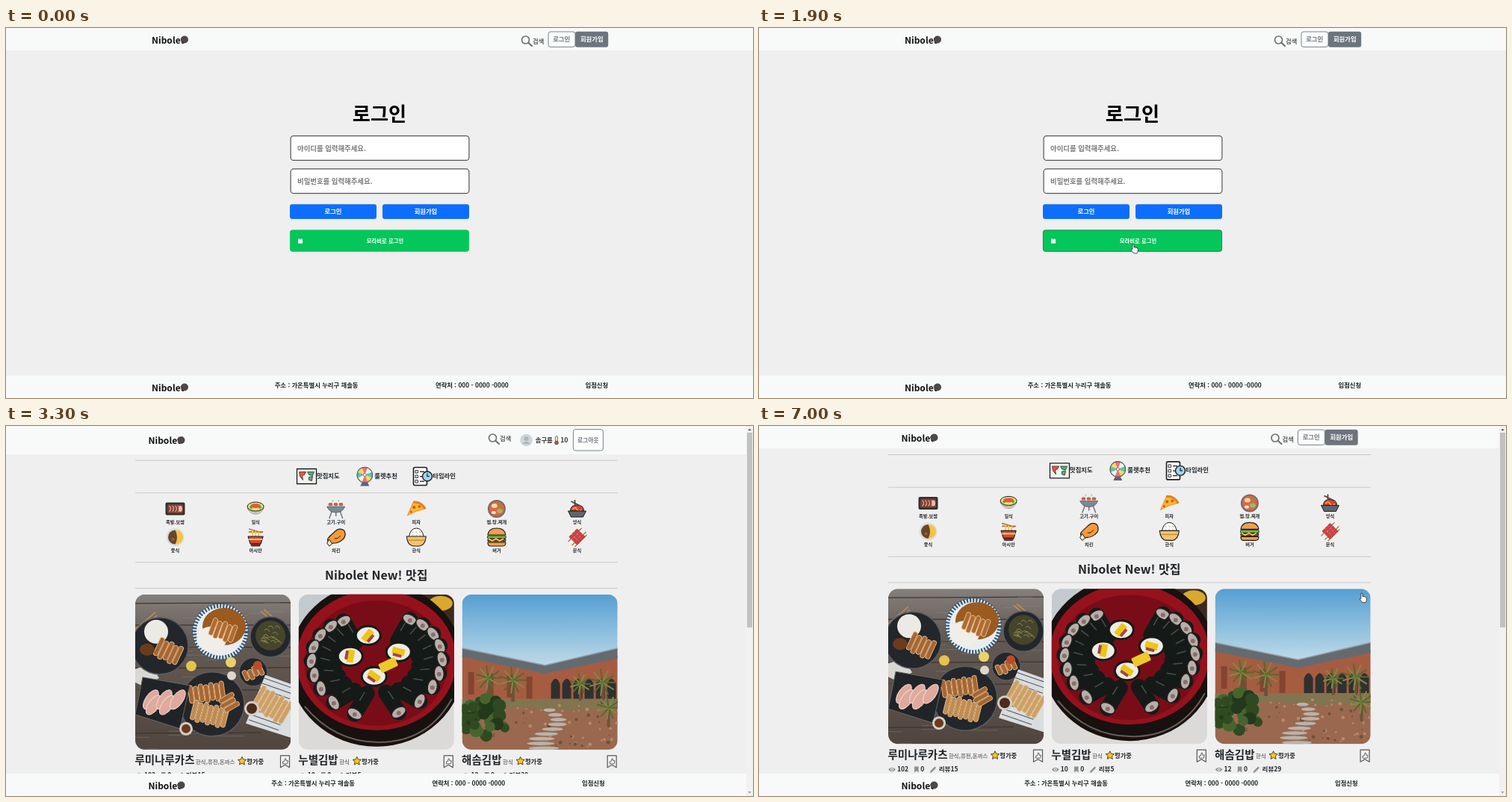
These frames come from a looping animation (1000 by 496 pixels, 7.1 s). An HTML page:

```html
<!DOCTYPE html>
<html lang="ko">
<head>
<meta charset="utf-8">
<title>로그인</title>
<style>
html, body { margin: 0; width: 100%; height: 100%; overflow: hidden; background: #fefefe; }
#stage { display: block; width: 100vw; height: 100vh; }
text { font-family: 'Noto Sans CJK KR', 'Noto Sans KR', 'Noto Sans CJK', sans-serif; font-weight: 700; white-space: pre; }
.loading .late { font-weight: 300; }
.loading .lazy { display: none; }
</style>
</head>
<body>
<svg id="stage" viewBox="0 0 1000 496"></svg>
<script>
const LOOP = 7100;
const BRAND = 'Nibolet';
const INK = '#212529', GRAY = '#6c757d', BAR = '#f8faf9', PAGE = '#efefef';

// ---------- drawing helpers ----------
// y is the visual middle of the line
const text = (s, x, y, size, fill = INK, anchor = 'start') =>
  `<text x="${x}" y="${y + size * 0.37}" font-size="${size}" fill="${fill}" text-anchor="${anchor}">${
    s.replace(/[맛밥]/g, '<tspan class="late">$&</tspan>')}</text>`;
const mid = (s, x, y, size, fill) => text(s, x, y, size, fill, 'middle');
const rect = (x, y, w, h, fill, r = 0, more = '') =>
  `<rect x="${x}" y="${y}" width="${w}" height="${h}" rx="${r}" fill="${fill}" ${more}/>`;
const dot = (x, y, r, fill, more = '') => `<circle cx="${x}" cy="${y}" r="${r}" fill="${fill}" ${more}/>`;
const oval = (x, y, rx, ry, fill, more = '') =>
  `<ellipse cx="${x}" cy="${y}" rx="${rx}" ry="${ry}" fill="${fill}" ${more}/>`;
const path = (d, fill, more = '') => `<path d="${d}" fill="${fill}" ${more}/>`;
const line = (d, color, w = 1, more = '') =>
  `<path d="${d}" fill="none" stroke="${color}" stroke-width="${w}" ${more}/>`;
const at = (x, y, body, more = '') => `<g transform="translate(${x} ${y})" ${more}>${body}</g>`;
const group = (id, body) => `<g id="${id}">${body}</g>`;
const times = (n, f) => Array.from({ length: n }, (_, i) => f(i)).join('');
const edge = (w = 1, c = '#1c1c1c') => `stroke="${c}" stroke-width="${w}" stroke-linejoin="round"`;

let seed = 7;
const rnd = () => (seed = (seed * 16807) % 2147483647) / 2147483647;

// ---------- shared page parts ----------
const logo = (x, y) => text(BRAND, x, y, 12, '#111') + dot(x + 44, y - 1, 5, '#4d4845');

const search = (x, y) =>
  dot(x - 1, y - 1, 5, 'none', edge(1.7, '#6f6f6f')) +
  line(`M${x + 3} ${y + 3}l4.5 4`, '#6f6f6f', 2.2, 'stroke-linecap="round"');

const guestBar = dx => rect(0, 0, 1000, 30, BAR) + at(dx, 0,
  logo(195, 16.5) + search(696.5, 17) + text('검색', 705, 18, 8.3, '#5c5c5c') +
  rect(726, 5, 36, 20.4, '#fcfdfd', 3, edge(0.9, GRAY)) + mid('로그인', 743.7, 15, 8.4, GRAY) +
  rect(762, 4.7, 44.2, 21, GRAY, 3) + mid('회원가입', 784.3, 15, 8.4, '#fff'));

const footer = dx => rect(0, 466, 1000, 30, BAR) + at(dx, 0,
  logo(195, 482.5) +
  text('주소 : 가온특별시 누리구 해솔동', 359.7, 479.3, 8.35) +
  text('연락처 : 000 - 0000 -0000', 575, 479.3, 8.35) +
  text('입점신청', 775.5, 479.3, 8.35));

// ---------- login page ----------
const field = (y, hint) =>
  rect(381.1, y, 238.8, 32.8, '#fff', 4, edge(1.2, '#555')) + text(hint, 390, y + 16.6, 9.4, '#7a7a7a');
const blue = (x, label) => rect(x, 236.3, 116, 19.8, '#0d6efd', 3) + mid(label, x + 58, 246.4, 8.3, '#fff');

const loginPage = rect(0, 0, 1000, 496, PAGE) + guestBar(0) + footer(0) +
  mid('로그인', 500, 115, 26.2, '#000') +
  field(144.6, '아이디를 입력해주세요.') +
  group('second', field(188.9, '비밀번호를 입력해주세요.')) +
  group('buttons', blue(380, '로그인') + blue(504, '회원가입') +
    rect(380.4, 270.9, 239.2, 28.6, '#03c75a', 3, 'id="social" stroke="#03c75a" stroke-width="0.8"') +
    rect(391, 282.7, 6, 6, '#fff') + mid('모라비로 로그인', 507.5, 285.6, 7.35, '#fff')) +
  group('errors', text('아이디를 입력해주세요.', 380.4, 184, 8.35, '#dc3545') +
    text('비밀번호를 입력해주세요.', 380.4, 240.7, 8.35, '#dc3545'));

// ---------- icons, centred on 0,0 ----------
const mapIcon = rect(-13, -10, 26, 20, '#f6f4ee', 0, edge(1.3)) +
  path('M-10-6h9l-2 4-3 1 1 6-4-5z', '#e4574c', edge(0.7)) +
  path('M1-6h9l-2 5-5-1z', '#4fb27c', edge(0.7)) + path('M3 1l5-1-1 6-4-1z', '#4fb27c', edge(0.7));
const wheelIcon = path('M-6 13l3-6h6l3 6z', '#5b6472') +
  times(8, i => path('M0-2L-4.1-11.9A10.7 10.7 0 0 1 4.1-11.9z',
    ['#f26d7d', '#f7f3e8', '#57c7a0', '#ffd667'][i % 4], `transform="rotate(${i * 45} 0 -2)"`)) +
  dot(0, -2, 10.3, 'none', edge(1.1, '#555c66')) + dot(0, -2, 2, '#fff', edge(0.8, '#555'));
const timeIcon = rect(-12.5, -12, 18, 24, '#fff', 2, edge(1.6)) +
  times(3, i => rect(-10, -8 + i * 6.5, 3.5, 3.5, '#fff', 0, edge(0.9)) + line(`M-4 ${-6.3 + i * 6.5}h6`, '#1c1c1c', 1.3)) +
  dot(6, 0, 6.5, '#9fd4f4', edge(1.4)) + line('M6-4v4h3', '#1c1c1c', 1.2);

const pork = rect(-13, -8.5, 26, 17, '#34302f', 2) + rect(-10.5, -6, 21, 12, '#7a4238', 2) +
  times(4, i => line(`M${-8 + i * 4}-4q4 4 0 8`, '#e9a08a', 1.3)) + oval(7, 0, 2.5, 4, '#f0b9a4');
const sushi = oval(0, -3, 11, 6, '#f4e06a', edge(1)) + oval(0, -4, 7, 3, '#e7563f') + dot(-6, -2, 2, '#57a845') +
  dot(6, -2, 2, '#57a845') + path('M-11-1q11 12 22 0q-4 8-11 8t-11-8z', '#f7f7f2', edge(0.7, '#555'));
const grill = line('M-5 2l-4 11M5 2l4 11M0 4v6', '#6c7680', 1.5) + path('M-12-3h24q-3 8-12 8t-12-8z', '#7d8993', edge(0.7, '#46505a')) +
  times(3, i => rect(-10 + i * 7, -8, 5.5, 4, '#c9653f', 1.5)) + line('M-5-12q2 2 0 3M3-12q2 2 0 3', '#aaa');
const pizza = path('M-12 9L-4-9Q6-10 12 0Q0 2-12 9z', '#fdb827', edge(0.7, '#d37a17')) +
  line('M-4-9Q6-10 12 0', '#d98324', 3) + dot(-3, -2, 2, '#dc4b32') + dot(4, -3, 1.8, '#dc4b32') + dot(-7, 4, 1.5, '#dc4b32');
const stew = dot(0, 0, 12, '#70706c') + dot(0, 0, 10, '#e5623d') + oval(-3, -4, 4, 3, '#f6d9a6') +
  oval(4, 3, 4, 3, '#8fc06b') + oval(-4, 5, 3, 2, '#f3eee0') + dot(4, -5, 2, '#57a845');
const pasta = path('M-9 3Q-9-5 0-5T9 3z', '#d8452f', edge(1)) + line('M-6 1q3-5 6 0t6 0', '#f7b84b', 1.4) +
  line('M-8-10L4-4M-3-12v7', '#444', 1.7) + path('M-12 3h24l-4 8h-16z', '#5d6670', edge(1));
const curry = dot(0, 0, 12, '#d9dfe2') + dot(1, 0, 9.5, '#f5c341') + path('M0-9.5A9.5 9.5 0 0 0 0 9.5Q5 0 0-9.5z', '#6b4528') + dot(-3, 3, 2, '#93633a');
const noodles = line('M-9-11L8-6M-9-7h19', '#b8743a', 1.8) + line('M-4-9V0M0-8V0M4-7V0', '#f5c65a', 2) +
  path('M-10-1h20l-3 10h-14z', '#d8492f', edge(1.1)) + rect(-6, 9, 12, 3, '#8d2d21', 1, edge(0.8)) + line('M-9 3h18', '#f7d27c', 2);
const chicken = path('M-2 8Q-12 10-11 2Q-8-2-3-6Q4-14 11-9Q15-1 8 4Q3 8-2 8z', '#f59a3c', edge(1.2)) +
  line('M-2 2q5 1 8-4', '#1c1c1c') + path('M-9 3l-3 5 3 4 4-3z', '#fbe7c6', edge(1));
const rice = path('M-10 0Q-8-12 0-12T10 0z', '#fffdf3', edge(1)) +
  times(6, i => line(`M${-6 + (i % 3) * 5} ${-7 + (i > 2) * 4}l2 1`, '#999', 0.9)) +
  path('M-13-1h26q-1 12-9 13h-8q-8-1-9-13z', '#f2c46b', edge(1.1)) + line('M-11 4h22', '#c78d3c', 1.4);
const burger = path('M-12-3Q-11-12 0-12T12-3z', '#f0a04b', edge(1.1)) + rect(-12.5, -2, 25, 4, '#6bbf4a', 2, edge(0.9)) +
  rect(-12, 2, 24, 4, '#8a4329', 1.5, edge(0.9)) + line('M-11 2l5 3 5-3 5 3 5-3', '#ffd24c', 1.6) +
  path('M-12 7h24q0 5-4 5h-16q-4 0-4-5z', '#f0a04b', edge(1.1));
const skewer = line('M-12 6L6-12M-7 11L12-7M-3 13L13-3', '#9b6b3d', 1.2) +
  times(3, i => times(3, j => rect(-9 + i * 6, -9 + j * 6, 5.3, 5.3, '#dc3d3d', 1.2, 'transform="rotate(45) scale(.88)" ' + edge(0.6, '#8d1f24'))));

const foods = [
  ['족발.보쌈', pork], ['일식', sushi], ['고기.구이', grill], ['피자', pizza], ['찜.탕.찌개', stew], ['양식', pasta],
  ['중식', curry], ['아시안', noodles], ['치킨', chicken], ['한식', rice], ['버거', burger], ['분식', skewer]
];
const category = ([name, icon], i) => {
  const x = 226.5 + (i % 6) * 107.6, y = 111 + Math.floor(i / 6) * 38;
  return at(x, y, icon, i ? 'class="lazy"' : 'id="firstIcon"') + mid(name, x, y + 17.6, 6.2);
};

// ---------- photos, 208 by 208 ----------
const slices = (x, y, n, len, turn, fill = '#a9652f') => `<g transform="translate(${x} ${y}) rotate(${turn})">${
  times(n, i => rect((i - n / 2) * 7, -len / 2 + (i % 2) * 2, 6, len, fill, 2.5, edge(0.9, '#e0bd90')))}</g>`;
const plate = (x, y, r) => dot(x, y, r, '#23262a', edge(1.5, '#595d60'));

const cutlets = () => rect(0, 0, 208, 208, 'url(#wood)') +
  times(8, i => line(`M0 ${i * 29 + 12}l208 ${i % 3 - 1}`, '#3d3531', 1.3)) +
  times(40, () => line(`M${rnd() * 190} ${rnd() * 208}h${10 + rnd() * 30}`, '#a2968d', 0.6, 'opacity=".5"')) +
  line('M0 47L27 24M2 53L29 28M168 22l26 24M172 20l26 22', '#b58a55', 1.8) +
  path('M0 100l20-6 12 18-20 12-12-6z', '#d9d7d3') +
  plate(33, 69, 38) + dot(28, 50, 16, '#eceae4') + slices(45, 76, 5, 26, 25) + oval(16, 74, 10, 8, '#6b3b20') +
  dot(114, 50, 37, '#e9edf0') + dot(114, 50, 35, 'none', edge(6, '#33587a') + ' stroke-dasharray="2.2 2"') +
  oval(119, 43, 29, 25, '#9b5a20') + oval(102, 60, 20, 17, '#f0eee8') + slices(118, 48, 5, 24, 20, '#b06a31') +
  plate(181, 57, 27) + dot(181, 55, 20, '#45452b') +
  times(16, () => line(`M${167 + rnd() * 22} ${43 + rnd() * 22}q4-4 7 2`, '#8a8a55')) +
  plate(158, 104, 19) + slices(158, 104, 4, 14, -25) + dot(164, 95, 6, '#b94b2d') +
  plate(103, 147, 43) + slices(96, 131, 7, 24, -8) + slices(100, 160, 7, 27, 14, '#c08a50') + slices(126, 145, 3, 22, 60) +
  path('M10 111l63 11-13 58-60-19z', '#202327', edge(1, '#666')) +
  times(5, i => oval(18 + i * 9, 140 + (i % 2) * 9, 7, 15, '#dfa99d', `transform="rotate(35 ${18 + i * 9} 145)" ` + edge(1, '#f1d9cf'))) +
  path('M174 108l34 12v72l-60-19z', '#d9dde0') + times(9, i => line(`M${172 - i * 2.5} ${112 + i * 7}l40 14`, '#4d5960', 1.1)) +
  slices(184, 148, 7, 33, 30, '#cda066') +
  dot(156, 153, 10, '#d5cec3') + dot(156, 153, 7, '#4c2a1c') + dot(68, 180, 9, '#d5cec3') + dot(68, 180, 6, '#6b3a20') +
  dot(75, 96, 7, '#e4c44b') + dot(128, 91, 7, '#e9d26a') + dot(129, 109, 6, '#ddd7cf');

const roll = (x, y) => {
  const dx = 104 - x, dy = 112 - y, d = Math.hypot(dx, dy), k = 32 / d;
  return line(`M${x} ${y}l${dx * k} ${dy * k}`, '#151a18', 21, 'stroke-linecap="round"') +
    line(`M${x + dx * k * .4} ${y - 7 + dy * k * .4}l${dx * k * .4} ${dy * k * .4}`, '#455049', 1.5) +
    oval(x, y, 6.5, 10.5, '#b9aeaa', `transform="rotate(${Math.atan2(dy, dx) * 57.3} ${x} ${y})" ` + edge(1.5, '#20221f')) +
    dot(x, y + 1, 3, '#87706b');
};
const arc = [[60, 36], [43, 43], [29, 55], [20, 71], [17, 89], [21, 108], [30, 126], [47, 145], [75, 160]];
const egg = (x, y, a) => at(x, y, oval(0, 0, 18, 14, '#151a18') + oval(0, 0, 15, 11, '#efece4') +
  `<g transform="rotate(${a})">${rect(-9, -5, 17, 9, '#edc615', 1)}${rect(-7, 3, 12, 4, '#a4444a', 1)}</g>`);
const rolls = () => rect(0, 0, 208, 208, '#dcdad8') + path('M150 0h58v60z', '#3c2a20') +
  oval(190, 12, 16, 10, '#d9a92e') + path('M0 0h45L0 40z', '#c3cad0') +
  oval(104, 94, 117, 110, '#17110f') + oval(104, 88, 107, 94, '#95121d') + oval(104, 92, 96, 84, '#790d17') +
  line('M8 150Q50 200 112 198T205 140', '#6a5d58', 2) +
  arc.map(([x, y]) => roll(x, y) + roll(209 - x, y - 2)).join('') +
  egg(93, 55, -50) + egg(69, 83, 100) + egg(134, 77, 15) + egg(101, 110, 35) + rect(108, 88, 24, 13, '#edc92b', 2, 'transform="rotate(-25 120 95)"');

const palm = (x, y, r) => line(`M${x} ${y}v${r * 1.6}`, '#6b5236', r / 4) +
  times(11, i => {
    const a = i * 0.571;
    return line(`M${x} ${y}l${Math.cos(a) * r} ${Math.sin(a) * r}`, i % 2 ? '#7f8a45' : '#56692f', 2);
  });
const garden = () => rect(0, 0, 208, 208, 'url(#sky)') +
  path('M0 80L111 102L208 82V150H0z', '#a65c41') + path('M0 72L111 95L208 72V86L111 106L0 84z', '#646b70') +
  line('M0 72L111 95L208 72', '#9aa1a5', 1.5) +
  times(6, i => path(`M${119 + i * 15} 143v-23q6-14 12 0v23z`, '#30302f')) +
  times(4, i => rect(8 + i * 26, 104 + i * 2, 8, 30, '#824530')) +
  rect(0, 140, 208, 68, '#99684f') + path('M0 140h208v11Q150 160 80 151L0 158z', '#81744f') +
  times(60, () => dot(rnd() * 208, 148 + rnd() * 58, 0.7 + rnd() * 1.8, rnd() > .5 ? '#b98769' : '#6f5139')) +
  times(9, i => oval(117 + Math.sin(i * .7) * 12, 155 + i * 6.4, 8 + i * 1.5, 2.4, '#b9b3aa')) +
  palm(35, 112, 17) + palm(68, 115, 18) + palm(158, 120, 14) + palm(188, 118, 18) + palm(196, 152, 16) +
  times(50, () => {
    const a = rnd() * 6.28, d = Math.sqrt(rnd());
    return dot(32 + Math.cos(a) * d * 34, 165 + Math.sin(a) * d * 26, 5 + rnd() * 4, ['#2f4a20', '#47642d', '#24391b'][Math.floor(rnd() * 3)]);
  });

// ---------- home page ----------
const star = path('M0-5.6l1.7 3.5 3.9.5-2.9 2.7.8 3.9L0 3.1-3.5 5l.8-3.9-2.9-2.7 3.9-.5z', '#ffc61a', edge(0.9, '#3a3320'));
const ribbon = path('M-6-8H6V8L0 4.5-6 8z', '#f4f4f4', edge(1.2, '#555')) +
  path('M-3 0h2l1-4 1.5.5V-1H4L3 3h-6z', 'none', edge(0.9, '#555'));
const eye = path('M-5 0Q0-5.5 5 0Q0 5.5-5 0z', '#8f8f8f') + dot(0, 0, 2, '#efefef') + dot(0, 0, 1, '#8f8f8f');
const mark = path('M-2.8-4H2.8V4L0 1.8-2.8 4z', '#8f8f8f');
const pen = line('M-3 3L3-3', '#8f8f8f', 2.4) + path('M-4.5 4.5l.6-2.5 1.9 1.9z', '#8f8f8f');

const cards = [
  { x: 173, name: '루미나루카츠', tags: '한식,퓨전,돈까스', tagX: 81, starX: 143, views: '102', review: 15, photo: cutlets },
  { x: 391.8, name: '누별김밥', tags: '한식', tagX: 54.5, starX: 78, views: '10', review: 5, photo: rolls },
  { x: 610.6, name: '해솜김밥', tags: '한식', tagX: 54.5, starX: 78, views: '12', review: 29, photo: garden }
];
const card = (c, i) => {
  const more = (c.views.length - 2) * 4.8;
  return `<svg class="photo" x="${c.x}" y="225.8" width="208.2" height="208.2" overflow="hidden"><g clip-path="url(#round)">${c.photo()}</g></svg>` +
    at(c.x, 0, text(c.name, -0.5, 448, 14.5) + text(c.tags, c.tagX, 449.8, 7.4, '#777') +
      at(c.starX, 449, star, 'class="lazy"') + text('평가중', c.starX + 6.3, 449.8, 8.3) +
      at(200.5, 449.8, ribbon, 'class="lazy"') +
      at(5, 468, eye) + text(c.views, 12, 467.8, 8.5) +
      at(33 + more, 468, mark) + text('0', 38.5 + more, 467.8, 8.5) +
      at(55.5 + more, 468, pen) + text('리뷰' + c.review, 63 + more, 467.8, 8.5));
};
const rule = y => rect(173, y, 646, 0.9, '#c6c6c6');

const memberBar = rect(0, 0, 1000, 38, BAR) + logo(190.5, 20) +
  group('memberSearch', search(652.5, 17) + text('검색', 661, 17.3, 8.3, '#5c5c5c')) +
  at(696.5, 19, dot(0, 0, 8.3, '#cfd4d8') + dot(0, -2, 3, '#aeb6bd') + path('M-5 5q5-7 10 0z', '#aeb6bd'), 'class="lazy"') +
  text('솜구름', 708.7, 19, 8.4, '#333') +
  rect(735.4, 13.5, 3.2, 9, '#f4e7d8', 1.6, edge(0.7, '#5c3a2a')) + dot(737, 22.5, 2.4, '#c5502c', edge(0.7, '#5c3a2a')) +
  text('10', 742.3, 19, 8.6, '#333') +
  rect(759.4, 4.6, 40, 28.4, '#fcfdfd', 3, 'id="logout" ' + edge(0.9, GRAY)) +
  `<g id="logoutText" fill="${GRAY}">${mid('로그아웃', 779.2, 18.8, 7.7, 'inherit').replace('fill="inherit"', '')}</g>`;

const scrollbar = rect(991, 0, 9, 496, '#f1f1f1') + rect(992, 9, 7, 261, '#c1c1c1', 0, 'id="thumb"') +
  path('M993.3 6h4.4l-2.2-2.6z', '#505050') + path('M993.3 490h4.4l-2.2 2.6z', '#a0a0a0');

const homePage = rect(0, 0, 1000, 496, PAGE) +
  group('content', rule(45.6) + rule(89.3) + rule(182.3) + rule(217) +
    at(402.5, 67.5, mapIcon) + text('맛집지도', 416, 66.5, 8.3) +
    at(480.3, 67.5, wheelIcon) + text('룰렛추천', 493.3, 66.5, 8.3) +
    at(558, 67.5, timeIcon) + text('타임라인', 571.3, 66.5, 8.3) +
    foods.map(category).join('') + mid(BRAND + ' New! 맛집', 495.8, 200, 16) + cards.map(card).join('')) +
  group('member', memberBar) + group('guest', guestBar(-4.5)) + footer(-4.5) + scrollbar;

// ---------- pointer ----------
const hand = path('M-1 0q1.2-.9 2 .3V4l1 .1q1-.5 1.6.4 1.1-.4 1.5.5 1.2-.2 1.2 1.2V9q-.3 2-1.3 3H.6Q-1.5 9.5-3 7.4q.1-1.5 1.8-.4z', '#fff', edge(0.8, '#222'));
const arrow = path('M0 0v10.4l2.4-2.2 1.6 3.7 1.6-.7L4 7.6h3.3z', '#fff', edge(0.7, '#222'));
// visible spans, each a list of [time, x, y]
const tracks = [
  { end: 2900, keys: [[200, 508, 328], [500, 504, 310], [900, 501, 290]] },
  { end: 5400, keys: [[3700, 635, 43], [4000, 706, 33], [4400, 793.5, 18]] },
  { end: 7000, keys: [[5400, 774, 15], [5500, 830, 9], [5700, 960, 5], [5800, 931, -5]] },
  { end: 7100, keys: [[7000, 807, 224.5]] }
];
function pointer(t) {
  const track = tracks.find(k => t >= k.keys[0][0] && t < k.end);
  if (!track) return null;
  const keys = track.keys, i = keys.findLastIndex(k => k[0] <= t);
  const a = keys[i], b = keys[i + 1];
  if (!b) return [a[1], a[2]];
  const p = (t - a[0]) / (b[0] - a[0]);
  return [a[1] + (b[1] - a[1]) * p, a[2] + (b[2] - a[2]) * p];
}

// ---------- scene ----------
const defs = `<defs>
<clipPath id="round"><rect width="208.2" height="208.2" rx="13"/></clipPath>
<linearGradient id="wood" x2="0" y2="1"><stop stop-color="#85807c"/><stop offset=".3" stop-color="#645a54"/><stop offset="1" stop-color="#51463f"/></linearGradient>
<linearGradient id="sky" x2="0" y2="1"><stop stop-color="#559fd2"/><stop offset=".45" stop-color="#bcd9e8"/></linearGradient>
</defs>`;
document.getElementById('stage').innerHTML = defs + group('login', loginPage) + group('home', homePage) +
  group('pointer', group('hand', hand) + group('arrow', arrow));

const el = id => document.getElementById(id);
const show = (id, on) => { el(id).style.display = on ? '' : 'none'; };
const move = (id, x, y) => el(id).setAttribute('transform', `translate(${x} ${y})`);
const photos = [...document.querySelectorAll('.photo')];
const loaded = [[0, 0, 0], [33, 208.2, 43], [208.2, 208.2, 208.2]];

function render(now) {
  const t = Math.floor((now % LOOP) / 100) * 100;
  const onLogin = t < 2900, invalid = t >= 1000 && t < 1700, guest = t >= 4900;
  const stage = t < 3200 ? 0 : t < 3300 ? 1 : 2;
  const pos = pointer(t);

  show('login', onLogin);
  show('home', t >= 3100);
  show('errors', invalid);
  move('second', 0, invalid ? 12.4 : 0);
  move('buttons', 0, invalid ? 25 : 0);
  const overSocial = onLogin && pos && !invalid && pos[1] < 300;
  el('social').setAttribute('stroke', overSocial ? '#146c43' : '#03c75a');

  el('home').setAttribute('class', stage < 2 ? 'loading' : '');
  show('firstIcon', stage > 0);
  photos.forEach((p, i) => p.setAttribute('height', loaded[stage][i]));
  el('thumb').setAttribute('height', stage < 2 ? 254 : 261);
  move('memberSearch', stage < 2 ? 20 : 0, 0);
  show('member', !guest);
  show('guest', guest);
  move('content', 0, guest ? -7.6 : 0);
  const overLogout = !guest && t >= 3700 && pos && pos[0] > 759;
  el('logout').setAttribute('fill', overLogout ? GRAY : '#fcfdfd');
  el('logoutText').setAttribute('fill', overLogout ? '#fff' : GRAY);

  show('pointer', pos);
  if (pos) {
    const link = overSocial || invalid || overLogout || (guest && t < 5400) || t >= 7000;
    show('hand', link);
    show('arrow', !link);
    move('pointer', pos[0], pos[1]);
  }
}

// text without its own colour takes the group's
document.querySelector('#logoutText text').removeAttribute('fill');
const start = performance.now();
function tick() {
  render(performance.now() - start);
  requestAnimationFrame(tick);
}
tick();
</script>
</body>
</html>
```
